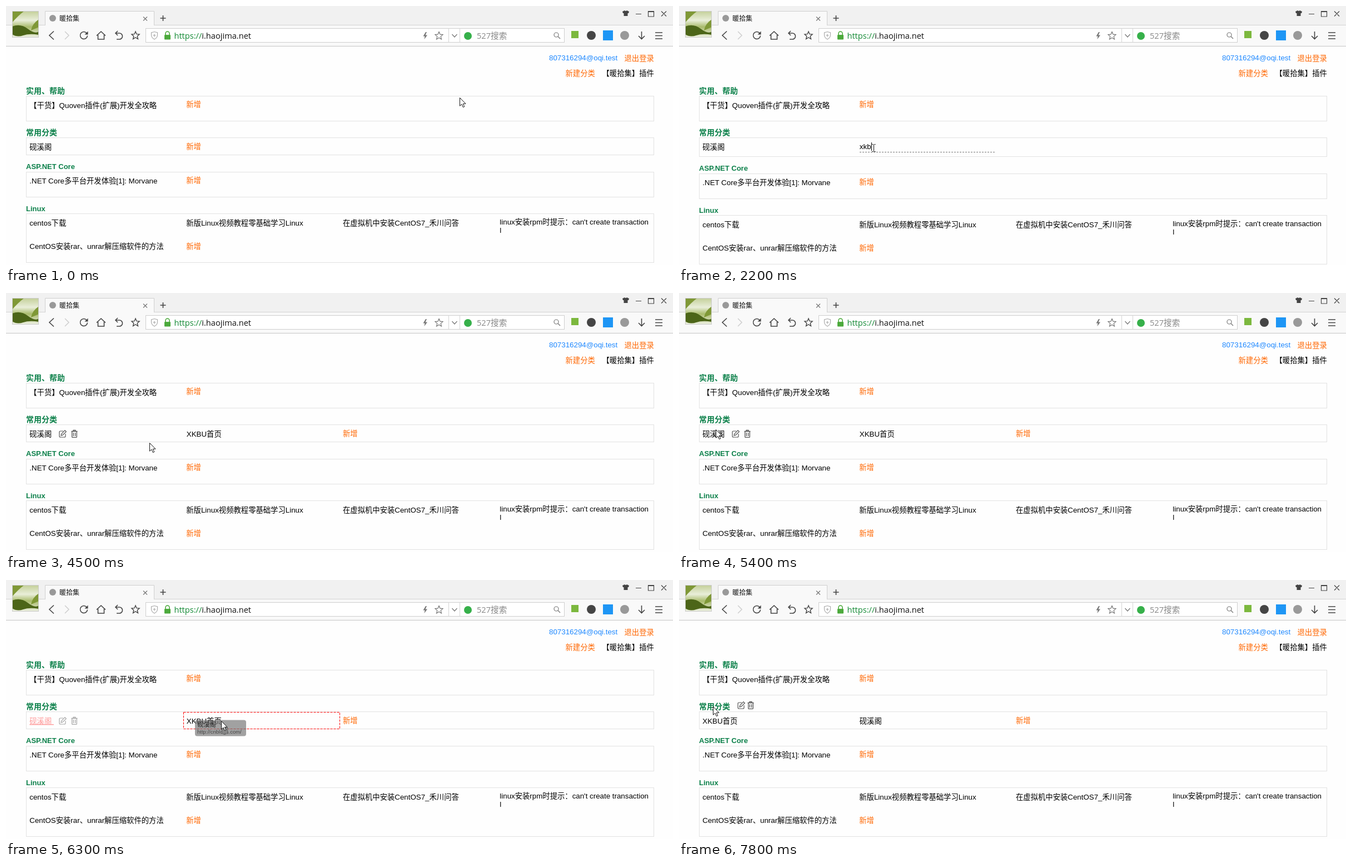
Recreate the animation shown at these times as an HTML page. Size 1200 by 467 pixels, loop 8000 ms.

```html
<!DOCTYPE html>
<html lang="zh-CN">
<head>
<meta charset="utf-8">
<title>书签页</title>
<style>
  html, body { margin: 0; width: 100%; height: 100%; overflow: hidden; background: #fefefe; }
  svg { display: block; width: 100%; height: 100%; }
  text { font: 13.333px 'Liberation Sans', 'Noto Sans CJK SC', 'Noto Sans CJK', sans-serif; fill: #000; white-space: pre; }
  .ui { font: 14.6px 'Open Sans', 'Noto Sans CJK SC', 'Noto Sans CJK', sans-serif; fill: #111; }
  .link { fill: #f60; }
  .head { font-weight: bold; font-size: 13px; fill: #0c804a; }
  .cjk { font-size: 14px; }
  .hover { fill: #f00; text-decoration: underline; }
  .line { fill: none; stroke: #444; stroke-width: 1.6; }
  .thin { fill: none; stroke: #777; stroke-width: 1.2; }
  .box { fill: none; stroke: #e2e2e2; }
</style>
</head>
<body>
<svg viewBox="0 0 1200 467" preserveAspectRatio="none">
  <defs>
    <linearGradient id="photo" x1="0" y1="0" x2="0" y2="1">
      <stop offset="0" stop-color="#c3cf98"/>
      <stop offset=".35" stop-color="#e9eed9"/>
      <stop offset=".6" stop-color="#a9bb6c"/>
      <stop offset="1" stop-color="#eef1e4"/>
    </linearGradient>
    <path id="star" d="M0-7 2-2.3 7-1.9 3.2 1.4 4.4 6.4 0 3.7-4.4 6.4-3.2 1.4-7-1.9-2-2.3Z"/>
    <g id="edit" fill="none" stroke="#555" stroke-width="1.2">
      <path d="M1-5H-4Q-6-5-6-3V4Q-6 6-4 6H3Q5 6 5 4V0"/>
      <path d="M-3 3-2.2 0 4-6.3 6.3-4 0 2.2Z"/>
    </g>
    <g id="trash" fill="none" stroke="#555" stroke-width="1.3">
      <path d="M-5.5-4.5H5.5M-2-4.5V-6.5H2V-4.5M-4.3-4.5V5.2Q-4.3 6.4-3 6.4H3Q4.3 6.4 4.3 5.2V-4.5M-1.6-2V4M1.6-2V4"/>
    </g>
    <path id="arrow" d="M.5.5V15.2L3.9 12 6.4 17.6 8.8 16.5 6.3 11.2H11Z" fill="#fff" stroke="#111"/>
    <path id="hand" d="M-1.5 1.5Q0-.8 1.5 1.5V7L5 7.5 9 9.2Q10 10 9.5 13L8 19H-1.5L-5 12.5Q-5.6 10.3-3.8 10.4L-1.5 12.8Z" fill="#fff" stroke="#111"/>
    <path id="beam" d="M-2.5-6.5H-.5L.5-5.5 1.5-6.5H3.5M.5-5.5V5.5M-2.5 6.5H-.5L.5 5.5 1.5 6.5H3.5" fill="none" stroke="#111"/>
  </defs>

  <g id="browser">
    <path d="M0 0H1200V35H0Z" fill="#f1f1f1"/>
    <path d="M0 35H1200V72H0Z" fill="#f9f9f9"/>
    <path d="M0 34.5H1200" stroke="#d4d4d4"/>
    <path d="M0 72.5H1200" stroke="#c6c6c6"/>
    <path d="M70.5 36V9.5H266.5V36Z" fill="#f9f9f9"/>
    <path d="M70.5 35V9.5H266.5V35" fill="none" stroke="#cfcfcf"/>
    <rect x="11" y="9" width="48" height="48" fill="url(#photo)"/>
    <path d="M11 9H33Q22 17 11 30ZM59 24Q47 32 45 44L59 38Z" fill="#7f9836"/>
    <path d="M11 37Q26 31 39 41T59 46V52Q42 49 31 53T11 51Z" fill="#4c6518"/>
    <rect x="11.5" y="9.5" width="47" height="47" fill="none" stroke="#ccc"/>
    <circle cx="84" cy="22" r="6" fill="#999"/>
    <text class="ui" x="96" y="26.5" style="font-size:12px">暖拾集</text>
    <path class="thin" d="M247 19.5 254 26.5M254 19.5 247 26.5"/>
    <path class="line" d="M277.5 22H287.5M282.5 17V27"/>
    <path d="M1109 10 1113 8Q1115 10 1117 8L1121 10 1120 13H1118.5V18H1111.5V13H1110Z" fill="#444"/>
    <path class="line" style="stroke-width:1.2" d="M1133 14.5H1143M1155.5 9.5H1165.5V19H1155.5ZM1155 10.5H1166M1179 9.5 1188 18.5M1188 9.5 1179 18.5"/>

    <path class="line" d="M86 45.5 78 53 86 60.5"/>
    <path class="line" d="M106 46 113 53 106 60" style="stroke:#d0d0d0"/>
    <path class="line" d="M145.5 49.5A6.5 6.5 0 1 0 146.5 53.5"/>
    <path d="M147.5 45.5V51.5H141.5Z" fill="#444"/>
    <path class="line" d="M163 53.5 171 46 179 53.5M165.5 52V60H176.5V52"/>
    <path class="line" d="M201 45 197 49 201 53M197.5 49H204A5.5 5.5 0 0 1 204 60H199"/>
    <use href="#star" x="233" y="53" class="line" style="stroke-width:1.4"/>
    <rect x="251.5" y="40.5" width="753" height="25" fill="#fff" stroke="#cfcfcf"/>
    <path d="M796.5 41V65M816.5 41V65" stroke="#d4d4d4"/>
    <path class="thin" style="stroke:#aaa" d="M267 46.5 272.5 48V53Q272 57.5 267 60 262 57.5 261.5 53V48ZM264.5 53H269.5M267 50.5V55.5"/>
    <path d="M287 52V49.5A3.5 3.5 0 0 1 294 49.5V52" fill="none" stroke="#4caa3c" stroke-width="1.6"/>
    <rect x="285" y="52" width="11" height="8.5" rx="1" fill="#4caa3c"/>
    <text class="ui" x="302.5" y="59"><tspan fill="#148a35">https://</tspan>i.haojima.net</text>
    <path d="M755 47 750.5 54.5H753.5L752.5 60 758 52.5H754.5L757 47Z" fill="#777"/>
    <use href="#star" x="779" y="53.5" class="thin"/>
    <path class="thin" d="M802.5 51 807 56 811.5 51"/>
    <circle cx="831" cy="54" r="7" fill="#36b04a"/>
    <text class="ui" x="847" y="59" style="fill:#888">527搜索</text>
    <circle class="thin" cx="990" cy="52" r="4"/>
    <path class="thin" d="M993 55 997 59"/>
    <rect x="1017" y="45" width="13" height="13" fill="#7cb83e"/>
    <circle cx="1053" cy="53" r="8" fill="#454545"/>
    <rect x="1074" y="44" width="18" height="18" fill="#1e96f5"/>
    <circle cx="1113" cy="53" r="8" fill="#999"/>
    <path class="line" d="M1143.5 46V59M1138 54 1143.5 59.5 1149 54"/>
    <path class="line" d="M1168 48H1181M1168 53.5H1181M1168 59H1181"/>
  </g>

  <g id="page">
    <text x="977" y="98" style="fill:#1e88ff">807316294@oqi.test</text>
    <text class="link" x="1112.5" y="98.5">退出登录</text>
    <text class="link" x="1006.5" y="126">新建分类</text>
    <text x="1072.5" y="126">【暖拾集】插件</text>

    <text class="head cjk" x="36" y="157.5">实用、帮助</text>
    <rect class="box" x="36.5" y="162.5" width="1129" height="45"/>
    <text x="42.3" y="184">【干货】Quoven插件(扩展)开发全攻略</text>
    <text class="link" x="324.3" y="181.5">新增</text>

    <text class="head cjk" x="36" y="233">常用分类</text>
    <rect class="box" id="row" x="36.5" y="237.5" width="1129" height="31"/>
    <text id="first" x="42.3" y="259"></text>
    <text id="second" x="324.8" y="259"></text>
    <text id="add" y="257.5">新增</text>
    <g id="field">
      <path d="M325 263.5H568" stroke="#777" stroke-dasharray="3 2"/>
      <text id="typed" x="324.8" y="258"></text>
      <path id="caret" d="M0 246V261" stroke="#000"/>
    </g>

    <g id="below">
      <text class="head" x="36" y="294">ASP.NET Core</text>
      <rect class="box" x="36.5" y="299.5" width="1129" height="45"/>
      <text x="42.3" y="320">.NET Core多平台开发体验[1]: Morvane</text>
      <text class="link" x="324.3" y="318.5">新增</text>
      <text class="head" x="36" y="369.5">Linux</text>
      <rect class="box" x="36.5" y="374.5" width="1129" height="88"/>
      <text x="42.3" y="396">centos下载</text>
      <text x="324.3" y="396">新版Linux视频教程零基础学习Linux</text>
      <text x="606" y="396">在虚拟机中安装CentOS7_禾川问答</text>
      <text x="888.3" y="394">linux安装rpm时提示：can't create transaction</text>
      <text x="888.3" y="409">l</text>
      <text x="42.3" y="438">CentOS安装rar、unrar解压缩软件的方法</text>
      <text class="link" x="324.3" y="438">新增</text>
    </g>

    <g id="tools"><use id="pen" href="#edit"/><use id="bin" href="#trash"/></g>
    <rect id="drop" y="238.5" width="281" height="30" fill="none" stroke="#f00" stroke-dasharray="4 2"/>
    <g id="label">
      <rect width="92" height="29" rx="4" fill="#777" fill-opacity=".68"/>
      <text x="4.5" y="12" style="font-size:11px;fill:#222">砚溪阁</text>
      <text x="4" y="24.5" style="font-size:9.5px;fill:#444">http://cnblogs.com/</text>
      <rect x="48.5" y="13.5" width="10" height="11" fill="#888" stroke="#444" stroke-dasharray="1 1"/>
    </g>
    <use id="cursor"/>
  </g>
</svg>

<script>
const LOOP = 8000, STEP = 100;
const $ = id => document.getElementById(id);
const SITE = '砚溪阁', ADDED = 'XKBU首页', ADDRESS = 'xkbu.net';
const KEYS = [1600, 1800, 2200, 2500, 3000, 3200, 3300, 3400];

// start, cursor, visible tools, then one x,y pair per step; the last pair holds
const MOVES = [
  [0, 'arrow', '', 816, 165],
  [100, 'arrow', '', 473, 212, 417, 204, 365, 221],
  [400, 'hand', '', 352, 246, 350, 249, 349, 251],
  [900, 'beam', '', 350, 256],
  [3900, 'hand', '', 350, 256],
  [4500, 'arrow', 'first', 258, 270, 150, 260],
  [4700, 'arrow', 'head', 122, 228],
  [4800, 'arrow', 'top', 117, 207, 115, 200],
  [5100, 'arrow', 'head', 100, 222, 85, 232],
  [5300, 'arrow', 'first', 71, 242, 66, 246],
  [5500, 'hand', 'first', 66, 246],
  [5700, 'arrow', 'first', 72, 247, 90, 248, 117, 249, 190, 252, 270, 255, 345, 256, 387, 254],
  [6500, 'hand', 'second', 387, 254],
  [6800, 'arrow', 'second', 387, 254],
  [7000, 'arrow', 'second', 365, 257, 330, 258],
  [7200, 'arrow', 'swapped', 260, 259, 190, 259, 130, 257, 90, 248],
  [7600, 'arrow', 'head', 68, 236, 63, 231, 61, 228]
];

// pen and bin centres
const TOOLS = {
  first: [102, 254, 123, 254],
  second: [384, 254, 405, 254],
  swapped: [125, 254, 146, 254],
  head: [112, 226, 129, 226],
  top: [291, 178, 48, 193]
};

const show = (el, on) => el.setAttribute('visibility', on ? 'visible' : 'hidden');
const place = (el, x, y) => el.setAttribute('transform', `translate(${x} ${y})`);

function setText(id, str, hovered) {
  const el = $(id);
  if (el.textContent !== str) el.textContent = str;
  el.classList.toggle('hover', hovered);
}

function draw(t) {
  const within = (a, b) => t >= a && t < b;
  const editing = within(900, 3800), added = t >= 3800, swapped = t >= 6500;
  const dragging = within(5700, 6500);

  const move = MOVES.filter(m => m[0] <= t).pop();
  const [start, shape, tools, ...path] = move;
  const i = 2 * Math.min(Math.floor((t - start) / STEP), path.length / 2 - 1);
  const x = path[i], y = path[i + 1];
  $('cursor').setAttribute('href', '#' + shape);
  place($('cursor'), x, y);

  setText('first', swapped ? ADDED : within(5500, 6500) ? SITE + ' ' : SITE, within(5500, 6500));
  setText('second', swapped ? SITE : added ? ADDED : '', within(3900, 4500));
  $('first').setAttribute('opacity', dragging ? .4 : 1);

  const add = $('add');
  show(add, !editing);
  add.setAttribute('x', added ? 606 : 324.3);
  add.setAttribute('class', within(400, 900) ? 'hover' : 'link');

  $('row').setAttribute('height', editing ? 34 : 31);
  place($('below'), 0, editing ? 3 : 0);

  show($('field'), editing);
  const typed = ADDRESS.slice(0, KEYS.filter(k => k <= t).length);
  setText('typed', typed, false);
  show($('caret'), editing && !within(1400, 1600));
  place($('caret'), Math.round(325 + (typed ? $('typed').getComputedTextLength() : 0)) + .5, 0);

  show($('tools'), tools);
  $('tools').setAttribute('opacity', dragging ? .5 : 1);
  if (tools) {
    const [px, py, bx, by] = TOOLS[tools];
    place($('pen'), px, py);
    place($('bin'), bx, by);
  }

  show($('drop'), dragging);
  $('drop').setAttribute('x', x < 320 ? 37.5 : 319.5);
  show($('label'), dragging);
  place($('label'), x - 47, y - 1.5);
}

function tick() {
  draw(performance.now() % LOOP);
  requestAnimationFrame(tick);
}
tick();
</script>
</body>
</html>
```
